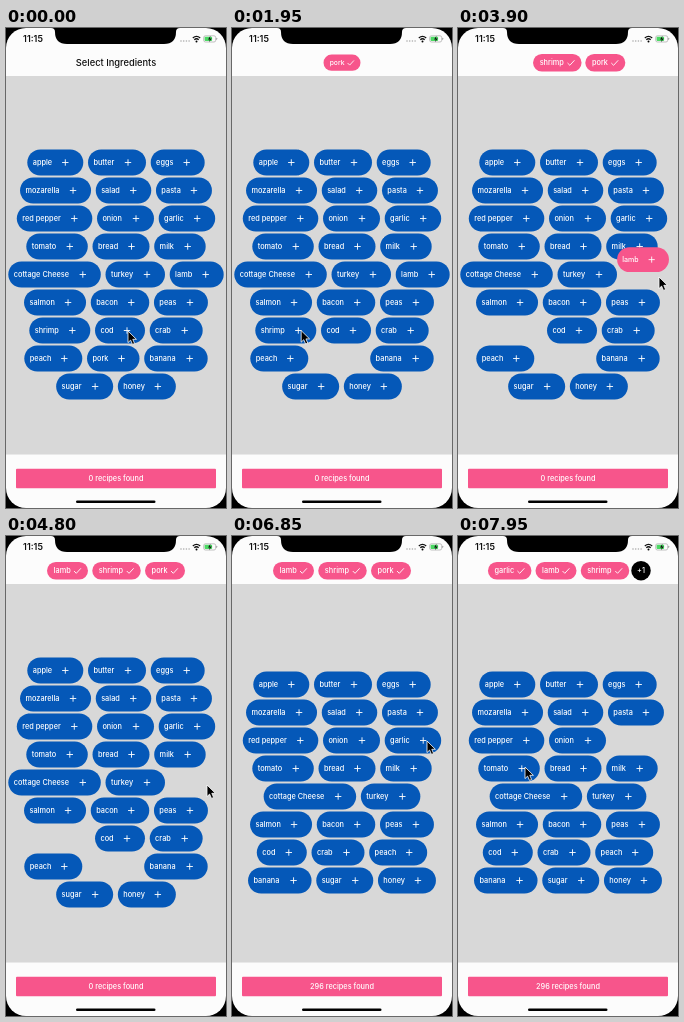
Recreate the animation shown at these times as an HTML page. Size 220 px wide and 480 px high, loop 8 s.

```html
<!DOCTYPE html>
<html lang="en">
<head>
<meta charset="utf-8">
<title>Select Ingredients</title>
<style>
  html, body { margin: 0; width: 100%; height: 100%; overflow: hidden; background: #000; }
  svg { display: block; width: 100%; height: 100%; }
  text { font: 500 7.35px Inter, Roboto, sans-serif; fill: #fff; }
  .mid { text-anchor: middle; }
  .line { fill: none; stroke: #fff; stroke-width: .9; }
  .title { font-size: 9.3px; fill: #111; }
  .clock { font-size: 9px; font-weight: 600; fill: #111; }
</style>
</head>
<body>
<svg viewBox="0 0 220 480">
  <rect width="220" height="480" rx="20" fill="#fcfcfc"/>
  <rect y="48" width="220" height="378.5" fill="#d8d8d8"/>
  <path d="M45 0Q49 0 49 4Q49 16 61 16H158Q170 16 170 4Q170 0 174 0Z"/>
  <text class="clock mid" x="27" y="14.3">11:15</text>
  <g fill="#aaa">
    <circle cx="175" cy="13" r=".8"/><circle cx="177.7" cy="13" r=".8"/>
    <circle cx="180.4" cy="13" r=".8"/><circle cx="183.1" cy="13" r=".8"/>
  </g>
  <path d="M186.8 10Q190.5 6.7 194.2 10M188.3 11.8Q190.5 9.8 192.7 11.8" fill="none" stroke="#111" stroke-width="1.3"/>
  <circle cx="190.5" cy="13.4" r="1"/>
  <rect x="197.7" y="7.8" width="12" height="6.2" rx="1.7" fill="none" stroke="#999" stroke-width=".6"/>
  <rect x="198.6" y="8.7" width="7.5" height="4.4" rx=".8" fill="#4cd964"/>
  <path d="M204.5 7.8l-2.5 3.6h1.8l-.8 2.8 2.8-3.7h-1.9z" fill="#111"/>
  <rect x="210.3" y="9.8" width=".8" height="2.2" rx=".4" fill="#999"/>
  <text class="title mid" id="title" x="110" y="38.4">Select Ingredients</text>
  <rect x="10" y="440.7" width="200" height="19.5" rx="1" fill="#f7558b"/>
  <text class="mid" id="count" x="110" y="453"></text>
  <rect x="70" y="472.4" width="79.5" height="2.7" rx="1.35"/>
  <g id="chips"></g>
  <g id="pills"></g>
  <path id="cursor" d="M0 0V11.6L2.6 9.1 4.5 13.4 6.6 12.5 4.8 8.3H8.4Z" stroke="#fff" stroke-width=".8"/>
</svg>
<script>
const LOOP = 8000, FLIGHT = 500, PRESS = 230, REFLOW = 6400;
const BLUE = '#0558b8', PINK = '#f7558b';
const byId = id => document.getElementById(id);

const widths = {
  apple: 56, butter: 58, eggs: 54, mozarella: 71, salad: 55.5, pasta: 56,
  'red pepper': 75.5, onion: 57, garlic: 56.5, tomato: 61.5, bread: 57, milk: 51.5,
  'cottage Cheese': 92.5, turkey: 59.5, lamb: 54, salmon: 62, bacon: 58.5, peas: 54,
  shrimp: 61, cod: 50, crab: 53, peach: 58, pork: 52.5, banana: 63.5, sugar: 57, honey: 58
};
const takeoff = { pork: 1300, shrimp: 2320, lamb: 3820, garlic: 7150 };

// Selected chips: width, time span shown, [time, centre x] stops
const chipSpecs = [
  { name: 'pork', w: 40, from: 1800, to: 7150, stops: [[2320, 110], [2600, 157], [2820, 157],
    [3050, 140], [3820, 140], [4100, 176], [4320, 176], [4550, 159]] },
  { name: 'shrimp', w: 48.5, from: 2820, to: LOOP, stops: [[3820, 92], [4100, 128], [4320, 128],
    [4550, 110.5], [7150, 110.5], [7400, 164], [7650, 164], [7850, 147]] },
  { name: 'lamb', w: 41, from: 4320, to: LOOP, stops: [[7150, 61.5], [7400, 115], [7650, 115], [7850, 98]] },
  { name: 'garlic', w: 43.5, from: 7650, to: LOOP, stops: [[7650, 51.7]] },
  { name: '+1', w: 19.5, from: 7150, to: LOOP, stops: [[7400, 200], [7650, 200], [7850, 183]] }
];
const cursorStops = [[450, 122, 303], [950, 120, 329], [1450, 120, 329], [2000, 68, 302],
  [2450, 68, 302], [3450, 201, 249], [5000, 201, 249], [6100, 200, 247], [6300, 200, 247],
  [6800, 195, 205], [7350, 195, 205], [7850, 67, 231]];

const clamp = v => Math.max(0, Math.min(1, v));
const ease = v => (v = clamp(v), v * v * (3 - 2 * v));
const mix = (a, b, p) => a + (b - a) * p;

function track(stops, t) {
  const next = stops.findIndex(s => s[0] > t);
  if (next === 0) return stops[0].slice(1);
  if (next < 0) return stops[stops.length - 1].slice(1);
  const a = stops[next - 1], b = stops[next];
  const p = ease((t - a[0]) / (b[0] - a[0]));
  return a.slice(1).map((v, i) => mix(v, b[i + 1], p));
}

// Centred rows, wrapped greedily and centred vertically
function layout(names) {
  const gap = 4.7, rows = [];
  let used = Infinity;
  for (const name of names) {
    if (used + gap + widths[name] > 218) { rows.push([]); used = -gap; }
    rows[rows.length - 1].push(name);
    used += gap + widths[name];
  }
  const spots = {};
  rows.forEach((row, i) => {
    const total = row.reduce((sum, n) => sum + widths[n] + gap, -gap);
    let x = 110 - total / 2;
    for (const n of row) {
      spots[n] = [x + widths[n] / 2, 246.5 + 28 * (i - (rows.length - 1) / 2)];
      x += widths[n] + gap;
    }
  });
  return spots;
}

function add(parent, tag, attrs, text = '') {
  const el = document.createElementNS('http://www.w3.org/2000/svg', tag);
  for (const key in attrs) el.setAttribute(key, attrs[key]);
  el.textContent = text;
  return parent.appendChild(el);
}

function capsule(parent, w, h, fill) {
  const g = add(parent, 'g', {});
  const rect = add(g, 'rect', { x: -w / 2, y: -h / 2, width: w, height: h, rx: h / 2, fill });
  return { g, rect };
}

function place(el, x, y, scale = 1) {
  el.setAttribute('transform', `translate(${x} ${y}) scale(${scale})`);
}

function show(el, visible) {
  el.style.display = visible ? '' : 'none';
}

const names = Object.keys(widths);
const before = layout(names);
const after = layout(names.filter(n => !['lamb', 'shrimp', 'pork'].includes(n)));

// Pills that fly are stacked above the rest
const stacked = [...names.filter(n => !takeoff[n]), ...Object.keys(takeoff)];
const pills = stacked.map(name => {
  const w = widths[name], pill = capsule(byId('pills'), w, 26, BLUE);
  add(pill.g, 'text', { x: 5.4 - w / 2, y: 2.5 }, name);
  add(pill.g, 'path', { class: 'line', d: `M${w / 2 - 21.2} 0h6.4m-3.2 -3.2v6.4` });
  return { name, ...pill };
});

const chips = chipSpecs.map(spec => {
  const more = spec.name === '+1';
  const chip = capsule(byId('chips'), spec.w, more ? 19.5 : 17.6, more ? '#000' : PINK);
  add(chip.g, 'text', more ? { class: 'mid', y: 2.6 } : { x: 6.6 - spec.w / 2, y: 2.5 }, spec.name);
  if (!more) add(chip.g, 'path', { class: 'line', d: `M${spec.w / 2 - 14} .3l2.3 2.3 4.6 -5` });
  return { ...spec, ...chip };
});

function render(t) {
  const shift = ease((t - REFLOW) / 300);
  for (const { name, g, rect } of pills) {
    const start = takeoff[name], a = before[name], b = after[name] || a;
    let x = mix(a[0], b[0], shift), y = mix(a[1], b[1], shift), scale = 1;
    if (start) {
      const p = ease((t - start) / FLIGHT);
      x = mix(x, 110, p);
      y = mix(y, 34.5, p);
      scale = 1 - .57 * p;
      rect.setAttribute('fill', t >= start - PRESS ? PINK : BLUE);
      show(g, t < start + FLIGHT);
    }
    place(g, x, y, scale);
  }
  for (const { g, from, to, stops } of chips) {
    show(g, t >= from && t < to);
    place(g, track(stops, t)[0], 34.7, mix(.5, 1, ease((t - from) / 200)));
  }
  show(byId('title'), t < 1500);
  byId('count').textContent = `${t < REFLOW ? 0 : 296} recipes found`;
  place(byId('cursor'), ...track(cursorStops, t));
}

const origin = performance.now();
function tick() {
  render((performance.now() - origin) % LOOP);
  requestAnimationFrame(tick);
}
render(0);
requestAnimationFrame(tick);
</script>
</body>
</html>
```
